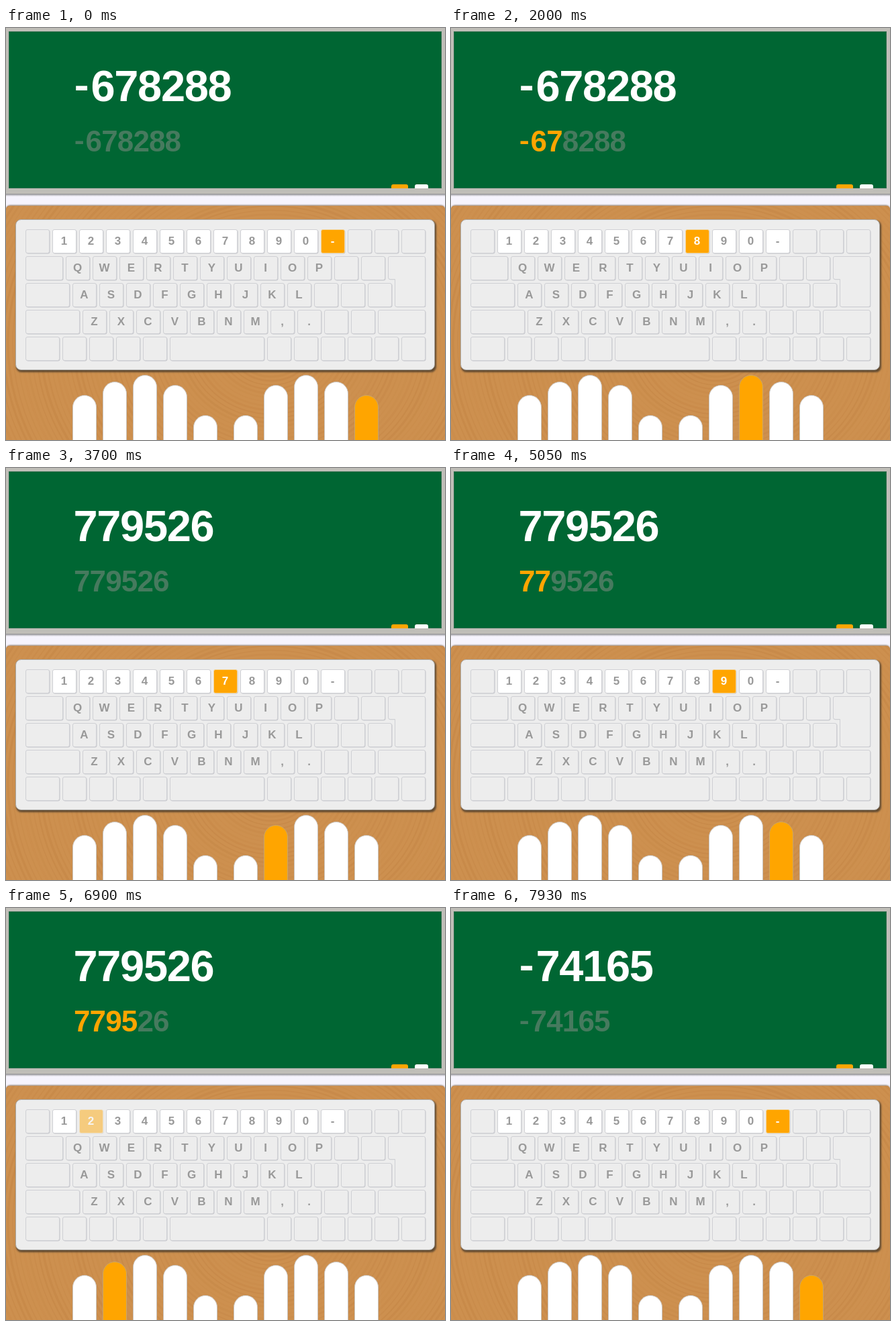
Recreate the animation shown at these times as an HTML page. Size 654 by 614 pixels, loop 8 s.

```html
<!DOCTYPE html>
<html lang="en">
<head>
<meta charset="utf-8">
<title>Typing practice</title>
<style>
  html, body { margin: 0; width: 100%; height: 100%; overflow: hidden; background: #f6f4fd; }
  svg { display: block; width: 654px; height: 614px; }
  text { font-family: "Liberation Sans", Arial, sans-serif; font-weight: bold; }
  .dash { font-family: Lato, sans-serif; }
  .label { font-size: 17px; text-anchor: middle; fill: #999; }
  .key { fill: #ededed; stroke: #cfd0d4; }
  .digit .key { fill: #fff; }
  .on .key { fill: #ffa500; stroke: #f3d6a0; }
  .on .label { fill: #fff; }
  .finger { fill: #fff; stroke: #c9c3bd; }
  .finger.on { fill: #ffa500; stroke: #c9a66a; }
</style>
</head>
<body>
<svg id="stage" viewBox="0 0 654 614" xmlns="http://www.w3.org/2000/svg">
  <defs>
    <linearGradient id="fall" x1="0" y1="0" x2="0" y2="1">
      <stop offset="0" stop-color="#777" stop-opacity=".85"/>
      <stop offset="1" stop-color="#777" stop-opacity="0"/>
    </linearGradient>
    <filter id="soft" x="-5%" y="-5%" width="110%" height="115%">
      <feGaussianBlur stdDeviation="1.2"/>
    </filter>
    <clipPath id="deskClip"><rect y="265" width="654" height="360" rx="5"/></clipPath>
  </defs>
  <rect width="654" height="614" fill="#f6f4fd"/>
  <rect y="247" width="654" height="4" fill="url(#fall)"/>
  <rect width="654" height="247" fill="#c0beb8"/>
  <rect x="4.5" y="5.5" width="644" height="233" fill="#006633" stroke="#2f6e4e"/>
  <path d="M574 239v-3q0-3 3-3h19q3 0 3 3v3z" fill="#ffa500"/>
  <path d="M609 239v-3q0-3 3-3h14q3 0 3 3v3z" fill="#fff"/>
  <g id="words"></g>
  <rect y="264" width="654" height="360" rx="6" fill="#8a7a6c" filter="url(#soft)"/>
  <g clip-path="url(#deskClip)">
    <rect y="265" width="654" height="349" fill="#cd904f"/>
    <g id="grain" fill="none" stroke="#a9672a"></g>
  </g>
  <rect x="15" y="287" width="626" height="226" rx="8" fill="#4a3a2c" opacity=".8" filter="url(#soft)"/>
  <rect x="14.5" y="285.5" width="624" height="224" rx="8" fill="#ededed" stroke="#aaa7a3"/>
  <g id="keys"></g>
  <g id="fingers"></g>
</svg>
<script>
const LOOP = 8000;
const WORDS = ["-678288", "779526", "-74165"];
// start time, word, characters typed
const STEPS = [
  [0, 0, 0], [1220, 0, 1], [1860, 0, 2], [2000, 0, 3], [2800, 0, 4], [3330, 0, 5], [3570, 0, 6],
  [3700, 1, 0], [4920, 1, 1], [5050, 1, 2], [6040, 1, 3], [6330, 1, 4], [7740, 1, 5],
  [7930, 2, 0]
];
const PULSE = { start: 6836, length: 248 };
const FINGER_TOPS = [548, 528, 518, 533, 578, 578, 533, 518, 528, 548];
const FINGER_OF = { 1: 0, 2: 1, 3: 2, 4: 3, 5: 3, 6: 6, 7: 6, 8: 7, 9: 8, 0: 9, "-": 9 };

const byId = id => document.getElementById(id);

function add(parent, tag, attrs = {}, text = "") {
  const el = document.createElementNS("http://www.w3.org/2000/svg", tag);
  for (const name in attrs) el.setAttribute(name, attrs[name]);
  el.textContent = text;
  parent.appendChild(el);
  return el;
}

function drawGrain() {
  for (let i = 1; i < 72; i++) {
    add(byId("grain"), "ellipse", {
      cx: 395, cy: 470, rx: i * 7, ry: i * 6.2,
      "stroke-width": 2.5 + Math.sin(i * 1.7),
      opacity: 0.1 + 0.05 * Math.sin(i * 0.8)
    });
  }
}

const keys = {};

function addKey(x, y, width, char = "") {
  const isDigit = /[\d-]/.test(char);
  const group = add(byId("keys"), "g", { class: isDigit ? "digit" : "" });
  add(group, "rect", { x: x + 1, y: y + 1, width: width - 0.5, height: 35.5, rx: 3, fill: "#c4c5cb" });
  add(group, "rect", { class: "key", x: x + 0.5, y: y + 0.5, width: width - 1, height: 35, rx: 2.5 });
  if (char) {
    add(group, "text", { class: "label", x: x + 17.5, y: y + 23 }, char);
    keys[char] = group;
  }
}

// a space in the labels stands for a blank key
function addRun(x, y, labels) {
  [...labels].forEach((c, i) => addKey(x + i * 40, y, 36, c.trim()));
}

function drawKeyboard() {
  addRun(29, 300, " 1234567890-   ");
  addKey(29, 340, 56);
  addRun(89, 340, "QWERTYUIOP  ");
  addKey(29, 380, 66);
  addRun(99, 380, "ASDFGHJKL   ");
  addKey(29, 420, 81);
  addRun(114, 420, "ZXCVBNM,.  ");
  addKey(554, 420, 71);
  addKey(29, 460, 51);
  addRun(84, 460, "    ");
  addKey(244, 460, 141);
  addRun(389, 460, "      ");
  const enter = "M571.5 340.5H622.5Q624.5 340.5 624.5 343V413Q624.5 415.5 622 415.5H582" +
    "Q579.5 415.5 579.5 413V374.5H572Q569.5 374.5 569.5 372V343Q569.5 340.5 571.5 340.5Z";
  add(byId("keys"), "path", { d: enter, fill: "#c4c5cb", transform: "translate(.8 .8)" });
  add(byId("keys"), "path", { d: enter, class: "key" });
}

const fingers = FINGER_TOPS.map((top, i) => {
  const x = 99.5 + i * 45 + (i > 4 ? 15 : 0);
  return add(byId("fingers"), "rect", { class: "finger", x, y: top - 0.5, width: 35, height: 140, rx: 17.5 });
});

function writeWord(word, typed, line) {
  let x = line.x;
  [...word].forEach((c, i) => {
    const dash = c === "-";
    add(byId("words"), "text", {
      class: dash ? "dash" : "", x, y: line.y, "font-size": line.size,
      fill: i < typed ? "#ffa500" : line.fill
    }, c);
    x += dash ? line.dash : line.step;
  });
}

const TOP_LINE = { x: 100.5, y: 109, size: 65, step: 34.8, dash: 26, fill: "#fff" };
const LOW_LINE = { x: 101, y: 184, size: 44, step: 23.6, dash: 17.6, fill: "#467a5e" };

let shown = null;

function showStep(step) {
  const [, index, typed] = step;
  const word = WORDS[index];
  const next = word[typed];
  byId("words").replaceChildren();
  writeWord(word, 0, TOP_LINE);
  writeWord(word, typed, LOW_LINE);
  for (const c in keys) keys[c].classList.toggle("on", c === next);
  fingers.forEach((f, i) => f.classList.toggle("on", i === FINGER_OF[next]));
  shown = step;
}

function render(t) {
  const step = STEPS.findLast(s => s[0] <= t);
  if (step !== shown) showStep(step);
  const phase = (t - PULSE.start) / PULSE.length;
  const pulsing = phase > 0 && phase < 1;
  keys[2].setAttribute("opacity", pulsing ? 0.5 + 0.5 * Math.cos(phase * 2 * Math.PI) : 1);
}

drawGrain();
drawKeyboard();
const begin = performance.now();

function tick() {
  render((performance.now() - begin) % LOOP);
  requestAnimationFrame(tick);
}
tick();
</script>
</body>
</html>
```
